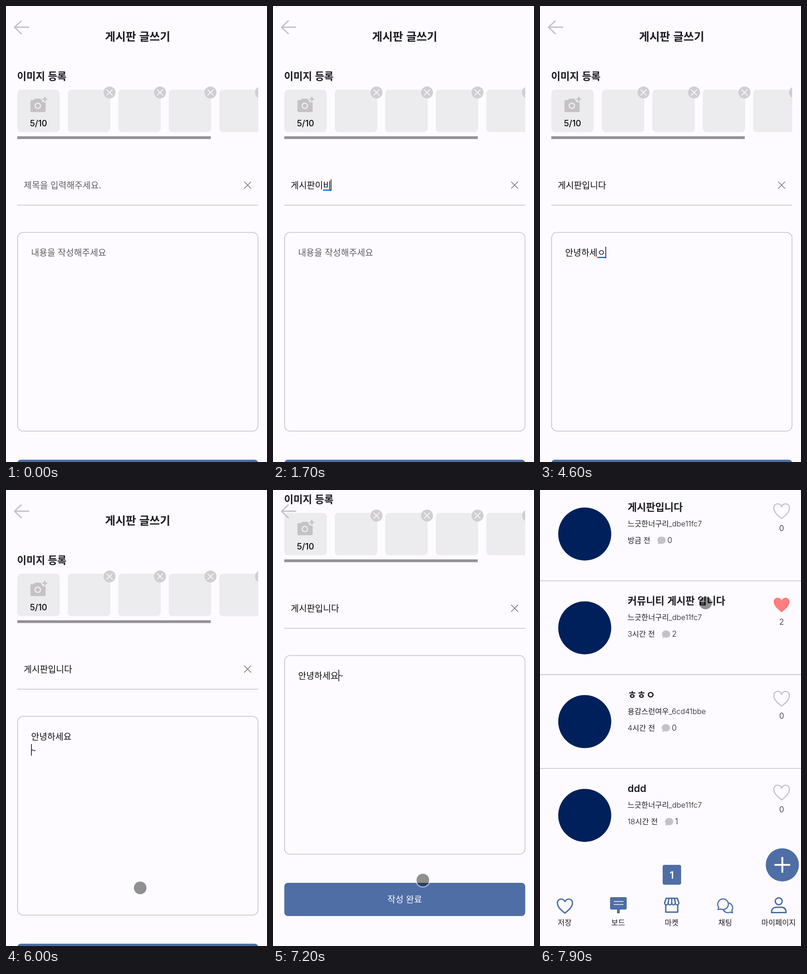
Animation of 566x989 px, one loop 8000 ms. Source, as an HTML page:

```html
<!DOCTYPE html>
<html lang="ko">
<head>
<meta charset="utf-8">
<title>게시판 글쓰기</title>
<style>
  html, body { margin: 0; width: 100%; height: 100%; overflow: hidden; background: #fdfbff; }
  svg { display: block; }
  text { font-family: "Noto Sans CJK KR", "Noto Sans CJK", sans-serif; fill: #1c1b1f; white-space: pre; }
  .mid { text-anchor: middle; }
  .head { font-size: 24.4px; font-weight: 600; }
  .label { font-size: 22px; font-weight: 600; }
  .field { font-size: 19px; font-weight: 500; fill: #0c0b0e; }
  .hint { font-size: 19px; fill: #5f5d62; }
  .count { font: 500 18.5px Inter, sans-serif; fill: #0c0b0e; }
  .post { font-size: 21.7px; font-weight: 600; }
  .meta { font-family: Inter, "Noto Sans CJK KR", "Noto Sans CJK", sans-serif; font-size: 16.2px; font-weight: 300; }
  .num { font-size: 17px; }
  .line { fill: none; stroke: #c4c2c6; stroke-width: 1.6; }
  .icon { fill: none; stroke: #4e6ea5; stroke-width: 3; stroke-linejoin: round; stroke-linecap: round; }
  .blue { fill: #4e6ea5; }
  .caret { fill: #0c0b0e; }
  .compose { fill: #1a73e0; }
</style>
</head>
<body>
<svg width="566" height="989" viewBox="0 0 566 989">
  <defs>
    <path id="heart" d="M0 16C-6 11-17 3-17-7C-17-13-12.5-16-9-16C-5-16-1.5-13.5 0-10C1.5-13.5 5-16 9-16C12.5-16 17-13 17-7C17 3 6 11 0 16Z"/>
    <path id="bubble" d="M0-8C5-8 9-5 9 0S5 8 0 8C-1.6 8-3 7.7-4.2 7.2C-5.5 8.2-7 8.6-8.6 8.6C-7.6 7.4-7 6-7 4.6C-8.3 3.3-9 1.8-9 0C-9-5-5-8 0-8Z" fill="#c4c2c6"/>
    <clipPath id="strip"><rect x="20" y="165" width="527" height="130"/></clipPath>
  </defs>

  <g id="editor">
    <g id="form">
      <text class="head mid" x="285.5" y="75">게시판 글쓰기</text>
      <text class="label" x="24" y="160">이미지 등록</text>
      <g id="thumbs" clip-path="url(#strip)"></g>
      <g fill="#c4c2c5">
        <path d="M56 204H60L63 201H75L77 204H83Q86 205 86 208V227Q86 230 83 230H56Q53 230 53 227V207Q53 204 56 204Z"/>
        <circle cx="84" cy="202" r="7.5" fill="#ecebed"/>
        <path d="M82.6 197h3v3.6H89.2v3H85.6v3.6h-3v-3.6H79v-3h3.600z"/>
        <circle cx="69" cy="216.500" r="5.800" stroke="#ecebed" stroke-width="2.800"/>
      </g>
      <text class="count mid" x="70.500" y="260.500">5/10</text>
      <rect x="24.500" y="282.500" width="419.500" height="6" fill="#939195"/>
      <path class="line" d="M24.500 432H547"/>
      <path d="M516.500 381l15 15m0-15l-15 15" stroke="#767478" stroke-width="1.500"/>
      <rect class="line" x="25.200" y="491" width="521.300" height="431" rx="12"/>
      <rect class="blue" x="24.500" y="984" width="522.500" height="72" rx="8"/>
      <text class="field mid" x="285.700" y="1027" style="fill:#fff">작성 완료</text>

      <text class="hint" id="titleHint" x="38.500" y="395.500">제목을 입력해주세요.</text>
      <text class="field" id="title" x="38.500" y="395.500"></text>
      <rect class="compose" id="titleMark" y="398" width="17.500" height="2.800"/>
      <rect class="caret" id="titleCaret" y="376" width="1.500" height="25"/>

      <text class="hint" id="bodyHint" x="54.500" y="541.500">내용을 작성해주세요</text>
      <text class="field" id="body" x="54.500" y="541.500"></text>
      <text class="field" id="body2" x="54.500" y="571.500"></text>
      <rect class="compose" id="bodyMark" y="544" width="17.500" height="2.800"/>
      <rect class="caret" id="bodyCaret" width="1.500" height="25"/>
    </g>
    <path d="M49 46H19M33 32.500L18.500 46L33 60" fill="none" stroke="#c4c2c6" stroke-width="3" stroke-linecap="round" stroke-linejoin="round"/>
  </g>

  <g id="board">
    <g id="posts"></g>
    <rect class="blue" x="266" y="813" width="40" height="43" rx="4"/>
    <text class="mid" x="285.700" y="842.500" style="font:600 22px Inter,sans-serif;fill:#fff">1</text>
    <circle class="blue" cx="525.500" cy="813" r="36"/>
    <path d="M508.500 813h34m-17-17v34" stroke="#fdfbff" stroke-width="4"/>
    <use class="icon" href="#heart" x="54" y="901.500" transform="translate(2.200 37) scale(.96)"/>
    <path class="blue" d="M155 883H185Q188 883 188 886V907Q188 910 185 910H173V918H167V910H155Q152 910 152 907V886Q152 883 155 883Z"/>
    <path d="M160 892.500h21m-21 6.500h21" stroke="#fdfbff" stroke-width="1.500"/>
    <path class="icon" transform="translate(285.700 900.500)" d="M-12-15H12L15.500-5a3.880 4.500 0 0 1-7.750 0a3.880 4.500 0 0 1-7.750 0a3.880 4.500 0 0 1-7.750 0a3.880 4.500 0 0 1-7.750 0ZM-7.750-5L-6-15M0-5V-15M7.750-5L6-15M-13 1V15H13V1"/>
    <path class="icon" transform="translate(401.500 901)" style="stroke-width:2.500" d="M-15.500 9L-14 4A11.500 11.500 0 1 1-9.500 7.800ZM9-5A11 11 0 0 1 14.500 11L16 16L11 14.500A11 11 0 0 1-3.500 10.500"/>
    <g class="icon"><circle cx="517.700" cy="892" r="7.500"/><path d="M502 916.500C502 908 507 905 512 905H523.500C529 905 533.500 908 533.500 916.500Z"/></g>
    <g id="tabs"></g>
  </g>

  <g id="dot">
    <circle r="15" fill="none" stroke="#fff" stroke-opacity=".5" stroke-width="2.500"/>
    <circle r="13.700" fill="#000" fill-opacity=".43"/>
  </g>
</svg>
<script>
const $ = id => document.getElementById(id);
const LOOP = 8000, STEP = 100, CHAR = 17.48;

$('thumbs').innerHTML = [0, 1, 2, 3, 4].map(i => {
  const x = 24.5 + 109.5 * i;
  const badge = `<circle cx="${x + 90.5}" cy="187.5" r="13" fill="#d0ced1"/>
    <path d="M${x + 84} 181l13 13m0-13l-13 13" stroke="#fff" stroke-width="1.6"/>`;
  return `<rect x="${x}" y="181.5" width="92" height="92" rx="8" fill="#ecebed"/>${i ? badge : ''}`;
}).join('');

const writer = '느긋한너구리_dbe11fc7';
const posts = [
  ['게시판입니다', writer, '방금 전', 263.5, 0, 0],
  ['커뮤니티 게시판 입니다', writer, '3시간 전', 273.5, 2, 2],
  ['ㅎㅎㅇ', '용감스런여우_6cd41bbe', '4시간 전', 273, 0, 0],
  ['ddd', writer, '18시간 전', 280, 1, 0]
];
$('posts').innerHTML = posts.map(([title, user, ago, x, replies, likes], i) => `
  <g transform="translate(0 ${203.4 * i})">
    <circle cx="97" cy="95.5" r="57.5" fill="#00205b"/>
    <text class="post" x="190" y="45"${title === 'ddd' ? ' style="font-family:Inter,sans-serif"' : ''}>${title}</text>
    <text class="meta" x="190" y="79">${user}</text>
    <text class="meta" x="190" y="115">${ago}</text>
    <use href="#bubble" x="${x}" y="109"/>
    <text class="meta num" x="${x + 12.7}" y="115">${replies}</text>
    <use href="#heart" x="524" y="46" ${likes ? 'fill="#ff7d7d"' : 'class="line" style="stroke-width:2.4"'}/>
    <text class="meta num mid" x="524" y="89">${likes}</text>
    ${i < 3 ? '<path class="line" d="M0 197H566"/>' : ''}
  </g>`).join('');

$('tabs').innerHTML = ['저장', '보드', '마켓', '채팅', '마이페이지'].map((name, i) =>
  `<text class="meta mid" x="${53.5 + 116 * i}" y="944">${name}</text>`).join('');

// Typed text: [time, value]
const titleKeys = [
  [0, ''], [800, 'ㄱ'], [900, '게'], [1000, '게ㅅ'], [1100, '게시'], [1200, '게시ㅍ'],
  [1300, '게시파'], [1400, '게시판'], [1500, '게시판ㅇ'], [1600, '게시판이'], [1700, '게시판이비'],
  [2000, '게시판이ㅂ'], [2100, '게시판이'], [2300, '게시판입'], [2500, '게시판입ㄴ'],
  [2600, '게시판입니'], [2900, '게시판입니ㄷ'], [3000, '게시판입니다']
];
const bodyKeys = [
  [0, ''], [3700, 'ㅇ'], [3800, '아'], [3900, '안'], [4000, '안녀'], [4100, '안녕'], [4200, '안녕ㅎ'],
  [4300, '안녕하'], [4400, '안녕하ㅅ'], [4500, '안녕하세'], [4600, '안녕하세ㅇ'], [4700, '안녕하세요'],
  [5200, '안녕하세요\n~'], [6200, '안녕하세요~']
];
// Pointer visits: end time, then [time, x, y] points
const visits = [
  [800, [100, 292, 390], [500, 299, 81]],
  [3700, [3200, 278, 876]],
  [6200, [5500, 291, 863]],
  [LOOP, [6500, 320, 770], [6800, 320, 770], [7200, 325, 846], [7300, 327, 888], [7500, 328, 890], [7900, 359, 245]]
];

const within = (t, a, b) => t >= a && t < b;
const typed = (keys, t) => keys.filter(k => k[0] <= t).pop()[1];
const show = (id, on) => $(id).setAttribute('visibility', on ? 'inherit' : 'hidden');
const put = (id, text) => { if ($(id).textContent !== text) $(id).textContent = text; };

function pointer(t) {
  const visit = visits.find(([end, first]) => within(t, first[0], end));
  if (!visit) return null;
  const points = visit.slice(1);
  const i = points.findIndex(p => p[0] > t);
  if (i < 0) return points[points.length - 1].slice(1);
  const [t0, x0, y0] = points[i - 1], [t1, x1, y1] = points[i];
  const u = (t - t0) / (t1 - t0);
  return [x0 + (x1 - x0) * u, y0 + (y1 - y0) * u];
}

function drawTitle(t) {
  const text = typed(titleKeys, t), end = 38.5 + CHAR * text.length;
  put('title', text);
  show('titleHint', !text);
  show('titleMark', within(t, 800, 3200));
  show('titleCaret', within(t, 300, 3300));
  $('titleMark').setAttribute('x', end - CHAR);
  $('titleCaret').setAttribute('x', end - .8);
}

function drawBody(t) {
  const text = typed(bodyKeys, t), [first, second = ''] = text.split('\n');
  const below = within(t, 5000, 6200), col = below ? 0 : Math.min(5, first.length);
  put('body', first);
  put('body2', second);
  show('bodyHint', !text);
  show('bodyMark', within(t, 3700, 4900));
  show('bodyCaret', within(t, 3400, 5200) || t >= 6000);
  $('bodyMark').setAttribute('x', 54.5 + CHAR * (col - 1));
  $('bodyCaret').setAttribute('x', 54.5 + CHAR * col);
  $('bodyCaret').setAttribute('y', below ? 551 : 522);
}

function draw(now) {
  const t = Math.floor(now % LOOP / STEP) * STEP;
  const scroll = t < 6700 ? 0 : Math.round(132 * (1 - Math.exp((6650 - t) / 81.6)));
  drawTitle(t);
  drawBody(t);
  $('form').setAttribute('transform', `translate(0 ${-scroll})`);
  show('editor', t < 7500);
  show('board', t >= 7500);
  const at = pointer(t);
  show('dot', at);
  if (at) $('dot').setAttribute('transform', `translate(${at})`);
  requestAnimationFrame(draw);
}
draw(performance.now());
</script>
</body>
</html>
```
